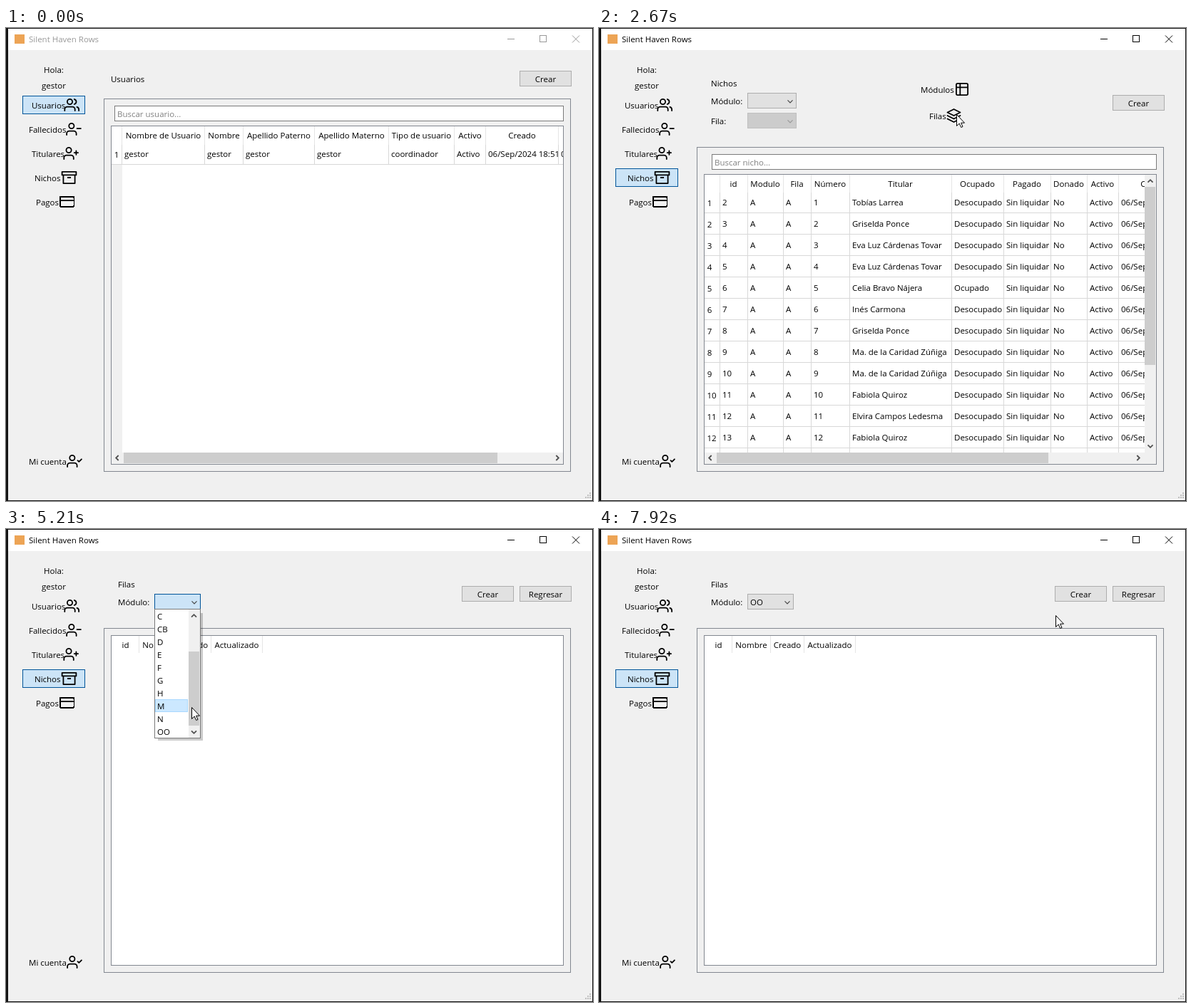
Write an HTML page that moves like this. It is 823 px wide and 664 px high and loops after 7.99 s.

```html
<!DOCTYPE html>
<html lang="es">
<head>
<meta charset="utf-8">
<title>Nichos</title>
<style>
html, body { margin: 0; width: 100%; height: 100%; overflow: hidden; background: #111; }
svg { display: block; width: 823px; height: 664px; }
text { font: 11.5px "Open Sans", "Noto Sans", sans-serif; white-space: pre; }
rect { shape-rendering: crispEdges; }
</style>
</head>
<body>
<svg id="stage" xmlns="http://www.w3.org/2000/svg" viewBox="0 0 823 664"></svg>
<script>
const LOOP = 7990;
const GRAY = '#f0f0f0', FRAME = '#828790', GRID = '#d8d8d8';
const USER = 'gestor', DATE = '06/Sep/2024 18:51';

// Drawing helpers: text is placed by its middle height, boxes by outer corners.
const text = (x, y, s, fill = '#000', anchor = 'start') =>
  `<text x="${x}" y="${y + 4}" fill="${fill}" text-anchor="${anchor}">${s}</text>`;
const mid = (x, y, s, fill) => text(x, y, s, fill, 'middle');
const fill = (x, y, x2, y2, c, id = '') =>
  `<rect ${id && `id="${id}"`} x="${x}" y="${y}" width="${x2 - x}" height="${y2 - y}" fill="${c}"/>`;
const box = (x, y, x2, y2, c, line, id = '') =>
  `<rect ${id && `id="${id}"`} x="${x + .5}" y="${y + .5}" width="${x2 - x - 1}" height="${y2 - y - 1}" fill="${c}" stroke="${line}"/>`;
const vline = (x, y, y2, c = GRID) => fill(x, y, x + 1, y2, c);
const hline = (x, x2, y, c = GRID) => fill(x, y, x2, y + 1, c);
const group = (id, s) => `<g id="${id}">${s}</g>`;
const clip = (id, x, y, x2, y2, s) =>
  `<clipPath id="${id}">${fill(x, y, x2, y2, '#000')}</clipPath><g clip-path="url(#${id})">${s}</g>`;
const button = (x, y, s) => box(x, y, x + 73, y + 22, '#e1e1e1', '#adadad') + mid(x + 36.5, y + 11.5, s);
const chevron = (x, y, turn, c = '#505050', w = 1.8, id = '') =>
  `<path ${id && `id="${id}"`} transform="translate(${x} ${y}) rotate(${turn})" d="M-3.5 -1.7L0 1.8L3.5 -1.7" fill="none" stroke="${c}" stroke-width="${w}"/>`;
const search = (x, y, s) => box(x, y, 782, y + 22, '#fff', '#7a7a7a') + text(x + 4, y + 11.5, s, '#808080');

const PERSON = '<path d="M16 21v-2a4 4 0 0 0-4-4H5a4 4 0 0 0-4 4v2"/><circle cx="8.5" cy="7" r="4"/>';
const ICONS = {
  users: '<path d="M17 21v-2a4 4 0 0 0-4-4H5a4 4 0 0 0-4 4v2M23 21v-2a4 4 0 0 0-3-3.87M16 3.13a4 4 0 0 1 0 7.75"/><circle cx="9" cy="7" r="4"/>',
  minus: PERSON + '<path d="M23 11H17"/>',
  plus: PERSON + '<path d="M20 8v6M23 11h-6"/>',
  check: PERSON + '<path d="M17 11l2 2 4-4"/>',
  archive: '<path d="M21 8V21H3V8M1 3H23V8H1ZM10 12h4"/>',
  card: '<rect x="1" y="4" width="22" height="16" rx="2" shape-rendering="auto"/><path d="M1 10H23"/>',
  layout: '<path d="M5 3H19a2 2 0 0 1 2 2V19a2 2 0 0 1-2 2H5a2 2 0 0 1-2-2V5a2 2 0 0 1 2-2ZM3 9H21M9 21V3"/>',
  layers: '<path d="M12 2L2 7l10 5 10-5zM2 17l10 5 10-5M2 12l10 5 10-5"/>'
};
const icon = (name, x, y) =>
  `<g transform="translate(${x} ${y}) scale(.9) translate(-12 -12)" fill="none" stroke="#000" stroke-width="2" stroke-linecap="round" stroke-linejoin="round">${ICONS[name]}</g>`;

function shell() {
  let grip = '';
  for (let r = 0; r < 3; r++)
    for (let c = 2 - r; c < 3; c++) grip += fill(812 + c * 3, 652 + r * 3, 814 + c * 3, 654 + r * 3, '#bfbfbf');
  return fill(0, 0, 823, 664, '#141414') + fill(3, 1, 822, 663, GRAY) + fill(3, 1, 822, 31, '#fff') +
    fill(12, 9, 26, 22, '#eda455') +
    `<g id="caption"><text x="32" y="20">Silent Haven Rows</text>
      <g fill="none" stroke="currentColor"><path d="M703 15.5h10M748.5 10.5h9v9h-9z" shape-rendering="crispEdges"/><path d="M794 10.5l10 10M804 10.5l-10 10"/></g></g>` +
    mid(67, 58.5, 'Hola:') + mid(67, 80.5, USER) +
    box(23, 95, 111, 121, '#cce4f7', '#005499', 'active') +
    text(36, 108.5, 'Usuarios') + icon('users', 92.2, 108) +
    text(32, 142.5, 'Fallecidos') + icon('minus', 95, 142) +
    text(36, 176.5, 'Titulares') + icon('plus', 91.2, 176) +
    text(40, 210.5, 'Nichos') + icon('archive', 88.5, 210) +
    text(42, 244.5, 'Pagos') + icon('card', 85.5, 244) +
    text(32, 608.5, 'Mi cuenta') + icon('check', 96, 608) + grip;
}

const hbar = (end, thumb) => fill(148, 596, 781, 612, GRAY) + fill(165, 596, thumb, 611, '#cdcdcd') +
  chevron(156, 603.5, 90) + chevron(end, 603.5, -90);

function usersPage() {
  const edges = [162, 278, 332, 432, 536, 628, 672, 774];
  const heads = ['Nombre de Usuario', 'Nombre', 'Apellido Paterno', 'Apellido Materno', 'Tipo de usuario', 'Activo', 'Creado', ''];
  const cells = [USER, USER, USER, USER, 'coordinador', 'Activo', DATE, DATE];
  let s = '';
  edges.forEach((x, i) => {
    s += vline(x, 138, 164, '#e5e5e5') + vline(x, 164, 192) + text(x + 4, 177, cells[i]);
    if (heads[i]) s += mid((x + edges[i + 1]) / 2 + .5, 151, heads[i]);
  });
  return text(147, 72, 'Usuarios') + button(720, 60, 'Crear') +
    box(137, 99, 792, 623, GRAY, FRAME) + search(152, 109, 'Buscar usuario...') +
    box(147, 137, 782, 613, '#fff', FRAME) + fill(148, 192, 163, 596, GRAY) +
    clip('c1', 148, 138, 781, 596, s + hline(148, 781, 191) + mid(155, 177.5, '1')) + hbar(773, 689);
}

function nichesPage() {
  const edges = [169, 208, 258, 297, 351, 494, 567, 633, 684, 728, 829];
  const heads = ['id', 'Modulo', 'Fila', 'Número', 'Titular', 'Ocupado', 'Pagado', 'Donado', 'Activo', 'Creado'];
  const [gp, el, fq] = ['Griselda Ponce', 'Eva Luz Cárdenas Tovar', 'Fabiola Quiroz'];
  const ma = 'Ma. de la Caridad Zúñiga';
  const owners = ['Tobías Larrea', gp, el, el, 'Celia Bravo Nájera', 'Inés Carmona', gp, ma, ma, fq, 'Elvira Campos Ledesma', fq];
  let s = '';
  heads.forEach((h, i) => {
    s += vline(edges[i], 206, 231, '#e5e5e5') + vline(edges[i], 231, 596) + mid((edges[i] + edges[i + 1]) / 2, 219, h);
  });
  owners.forEach((owner, r) => {
    const y = 245 + r * 30;
    s += hline(148, 765, y + 14) + mid(155 + (r > 8 ? 3 : 0), y + .5, r + 1);
    [r + 2, 'A', 'A', r + 1, owner, r === 4 ? 'Ocupado' : 'Desocupado', 'Sin liquidar', 'No', 'Activo', DATE]
      .forEach((v, i) => s += text(edges[i] + 4, y, v));
  });
  return text(157, 78, 'Nichos') + text(157, 103, 'Módulo:') + text(157, 131, 'Fila:') +
    box(208, 91, 277, 113, '#e1e1e1', '#adadad') + chevron(268, 103, 0, '#444', 1.2) +
    box(208, 119, 277, 141, '#ccc', '#bfbfbf') + chevron(268, 131, 0, '#999', 1.2) +
    text(451, 87, 'Módulos') + icon('layout', 509, 86) + text(463, 124, 'Filas') + icon('layers', 497.5, 123) +
    button(720, 94, 'Crear') + box(137, 167, 792, 623, GRAY, FRAME) + search(158, 177, 'Buscar nicho...') +
    box(147, 205, 782, 613, '#fff', FRAME) + clip('c2', 148, 206, 765, 596, s) + hbar(756, 630) +
    fill(765, 206, 781, 596, GRAY) + fill(765, 223, 780, 473, '#cdcdcd') +
    chevron(773, 215, 180) + chevron(773, 587, 0);
}

function rowsPage() {
  const edges = [148, 186, 240, 287, 359];
  let s = '';
  ['id', 'Nombre', 'Creado', 'Actualizado'].forEach((h, i) => {
    s += vline(edges[i + 1], 150, 174, '#e5e5e5') + mid((edges[i] + edges[i + 1]) / 2 + .5, 163, h);
  });
  return text(157, 78, 'Filas') + text(157, 103, 'Módulo:') +
    box(208, 91, 273, 113, '#e1e1e1', '#adadad', 'combo') + chevron(264, 103, 0, '#444', 1.2) +
    group('chosen', text(212, 103, 'OO')) +
    button(639, 80, 'Crear') + button(720, 80, 'Regresar') +
    box(137, 139, 792, 623, GRAY, FRAME) + box(147, 149, 782, 613, '#fff', FRAME) + s;
}

function popup() {
  const items = ['', 'DSC', 'A', 'B', 'C', 'CB', 'D', 'E', 'F', 'G', 'H', 'M', 'N', 'OO'];
  const list = items.map((v, i) => text(212, 122.5 + i * 18, v)).join('');
  return `<clipPath id="roll">${fill(200, 112, 290, 300, '#000', 'rollBox')}</clipPath><g clip-path="url(#roll)">` +
    '<g opacity=".2">' + fill(213, 118, 276, 297, '#000') + fill(213, 118, 275, 296, '#000') + fill(213, 118, 274, 295, '#000') + '</g>' +
    box(208, 112, 273, 294, '#fff', '#7a7a7a') +
    box(209, 113, 255, 131, '#cce8ff', '#a8d8ff', 'hot') +
    clip('c3', 209, 113, 255, 293, group('items', list)) +
    fill(256, 113, 272, 293, GRAY) + fill(256, 130, 271, 234, '#cdcdcd', 'thumb') +
    chevron(263.5, 122, 180) + chevron(263.5, 285, 0, '#505050', 1.8, 'down') + '</g>';
}

document.getElementById('stage').innerHTML = shell() +
  group('users', usersPage()) + group('niches', nichesPage()) + group('rows', rowsPage()) + group('popup', popup()) +
  group('cursor', '<path d="M.5 .5V16.5L4.2 13L6.7 18.5L9 17.5L6.6 12.2H11.5Z" fill="#fff" stroke="#000"/>');

const el = id => document.getElementById(id);
const show = (id, on) => el(id).setAttribute('display', on ? 'inline' : 'none');
const set = (id, attrs) => { for (const k in attrs) el(id).setAttribute(k, attrs[k]); };
const ramp = (t, a, b) => Math.min(1, Math.max(0, (t - a) / (b - a)));
const mix = (a, b, k) => `rgb(${a.map((v, i) => Math.round(v + (b[i] - v) * k))})`;

// Pointer track: time, x, y.
const TRACK = [
  [250, 397, 612], [460, 225, 500], [670, 62, 390], [810, 16, 300], [950, 60, 202], [1010, 60, 202], [1150, 57, 208],
  [1830, 57, 208], [2040, 135, 178], [2250, 290, 145], [2460, 440, 122], [2670, 501, 121],
  [3550, 501, 121], [3690, 425, 110], [3900, 263, 92], [3970, 250, 89], [4110, 245, 99],
  [4520, 245, 99], [4660, 246, 130], [4730, 248, 166], [5010, 256, 230], [5210, 262, 258], [5350, 260, 268],
  [5560, 264, 286], [5700, 250, 288], [5840, 250, 292], [6050, 250, 292], [6190, 226, 283],
  [6670, 226, 283], [6960, 275, 237], [7430, 349, 158], [7640, 440, 120], [7780, 550, 108], [7920, 640, 121]
];
// The pointer advances in ticks of 70 ms, counted from the start of each move.
const STARTS = [250, 1080, 1900, 3620, 4590, 5420, 6120, 6670, 7500];
function pointer(t) {
  const s = STARTS.filter(v => v <= t).pop() || 0;
  const q = s + Math.floor((t - s) / 70) * 70;
  const i = TRACK.findIndex(k => k[0] > q);
  if (i < 0) return TRACK[TRACK.length - 1].slice(1);
  if (i === 0) return TRACK[0].slice(1);
  const [a, b] = [TRACK[i - 1], TRACK[i]], k = ramp(q, a[0], b[0]);
  return [a[1] + (b[1] - a[1]) * k, a[2] + (b[2] - a[2]) * k].map(Math.round);
}

const IDLE = [225, 225, 225], HOVER = [229, 241, 251], PRESS = [204, 228, 247];
function comboFill(t) {
  if (t < 4200) return mix(IDLE, HOVER, ramp(t, 3900, 4110));
  if (t < 6670) return mix(HOVER, PRESS, ramp(t, 4200, 5000));
  return mix(PRESS, IDLE, ramp(t, 6670, 7000));
}
function comboLine(t) {
  const rest = [173, 173, 173], lit = [0, 84, 153];
  return t < 6670 ? mix(rest, lit, ramp(t, 3900, 4250)) : mix(lit, rest, ramp(t, 6670, 7000));
}

function render(t) {
  const on = t >= 1500, niches = t >= 1570 && t < 3070, rows = t >= 3070;
  const open = t >= 4200 && t < 6670;
  const ink = on ? '#000' : '#999';
  el('caption').style.color = ink;
  el('caption').firstElementChild.setAttribute('fill', ink);
  set('active', { y: on ? 197.5 : 95.5 });
  show('users', t < 1570);
  show('niches', niches);
  show('rows', rows);
  show('popup', open);
  show('chosen', t >= 6670);
  set('combo', { fill: comboFill(t), stroke: comboLine(t) });

  const [x, y] = pointer(t);
  show('cursor', t >= 250);
  set('cursor', { transform: `translate(${x} ${y})` });

  if (open) {
    const scroll = t < 5080 ? 0 : t < 5150 ? 3 : 4;
    const row = Math.max(0, Math.min(9, Math.floor((y - 113) / 18)));
    const dark = t < 5640 ? ramp(t, 5420, 5560) : 1 - ramp(t, 5660, 5840);
    set('rollBox', { height: 188 * ramp(t, 4130, 4340) });
    set('hot', { y: 113.5 + row * 18 });
    set('items', { transform: `translate(0 ${-18 * scroll})` });
    set('thumb', { y: 130 + 10.5 * scroll, fill: mix([205, 205, 205], [166, 166, 166], dark) });
    set('down', { stroke: t >= 5490 && t < 5980 ? '#000' : '#505050' });
  }
}

const begin = performance.now();
function frame() {
  render((performance.now() - begin) % LOOP);
  requestAnimationFrame(frame);
}
frame();
</script>
</body>
</html>
```
